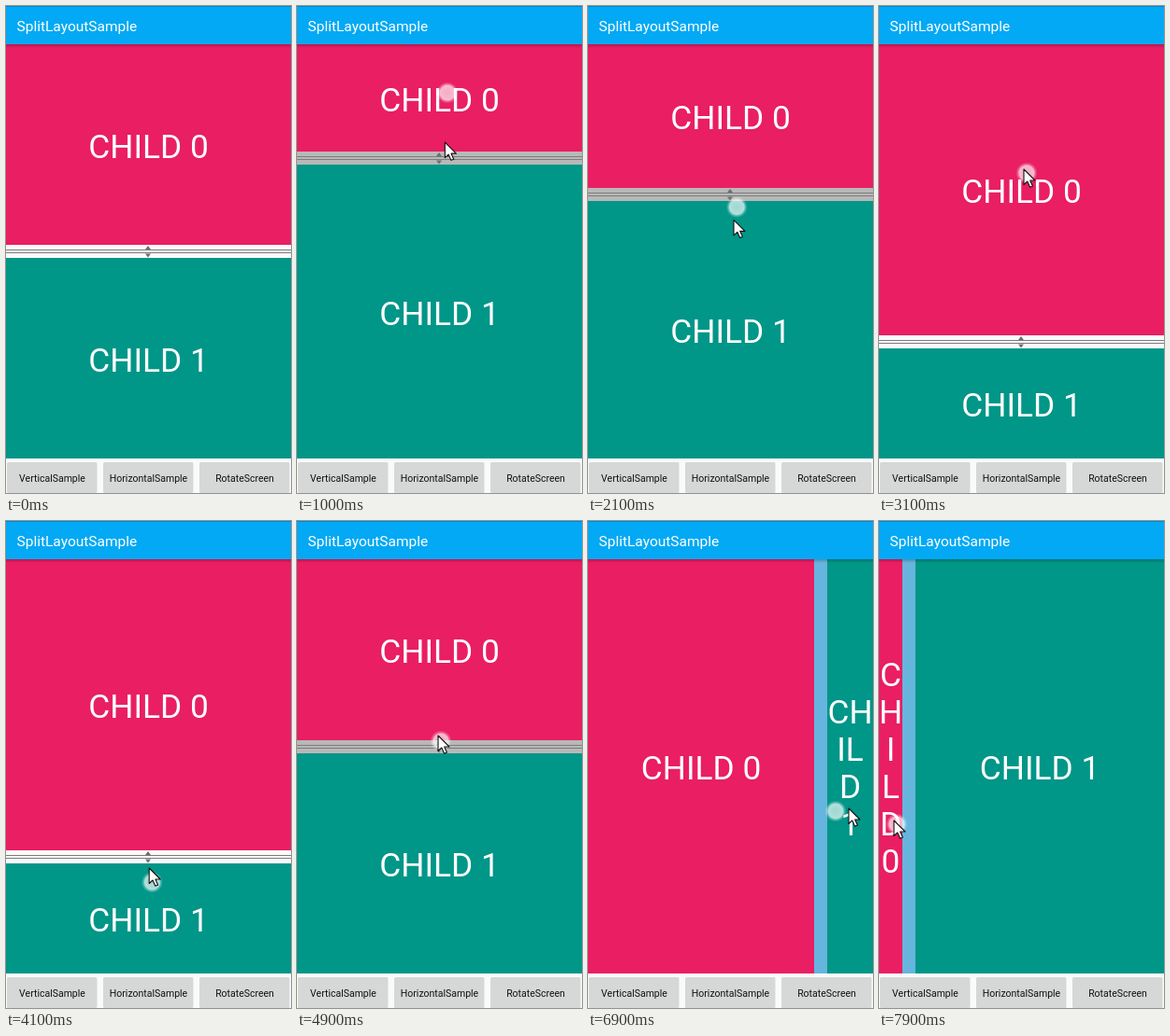
Recreate the animation shown at these times as an HTML page. Size 305x522 px, loop 8000 ms.

```html
<!DOCTYPE html>
<html lang="en">
<head>
<meta charset="utf-8">
<title>Split layout</title>
<style>
  html, body { margin: 0; width: 100%; height: 100%; overflow: hidden; background: #fafafa; }
  svg { display: block; width: 305px; height: 522px; }
  text { font-family: Roboto, sans-serif; }
  .child { font-size: 35.3px; fill: #fff; text-anchor: middle; }
  .label { font-size: 10.5px; fill: #111; text-anchor: middle; }
</style>
</head>
<body>
<svg viewBox="0 0 305 522">
  <defs>
    <linearGradient id="shade" x2="0" y2="1">
      <stop offset="0" stop-opacity=".22"/>
      <stop offset="1" stop-opacity="0"/>
    </linearGradient>
    <radialGradient id="glow">
      <stop offset="0" stop-color="#fff" stop-opacity=".62"/>
      <stop offset=".68" stop-color="#fff" stop-opacity=".7"/>
      <stop offset=".8" stop-color="#fff" stop-opacity=".32"/>
      <stop offset="1" stop-color="#fff" stop-opacity="0"/>
    </radialGradient>
  </defs>
  <rect width="305" height="522" fill="#fafafa"/>
  <rect id="pane0" fill="#e91e63"/>
  <rect id="pane1" fill="#009688"/>
  <rect id="bar"/>
  <g id="grip">
    <path d="M0 5.5H305M0 8.5H305" stroke="#7c7c7c"/>
    <path d="M149 5L152 1L155 5ZM149 9.5L152 13.5L155 9.5Z" fill="#6e6e6e"/>
  </g>
  <g id="text0" class="child"></g>
  <g id="text1" class="child"></g>
  <rect y="41" width="305" height="4" fill="url(#shade)"/>
  <rect width="305" height="41" fill="#03a9f4"/>
  <rect width="305" height="1" fill="#0288d1"/>
  <text x="11.5" y="27" font-size="15.5" fill="#fff">SplitLayoutSample</text>
  <g id="buttons"></g>
  <circle id="touch" r="11.5" fill="url(#glow)"/>
  <path id="cursor" d="M0 0V16.5L3.8 13L6.6 19.2L9.4 18L6.7 12H12Z" fill="#fff" stroke="#111" stroke-width="1.1" stroke-linejoin="round"/>
</svg>
<script>
const NS = 'http://www.w3.org/2000/svg';
const $ = id => document.getElementById(id);
const LOOP = 8000, STEP = 100, LAG = 40;
const TOP = 41, BOTTOM = 485, WIDTH = 305, BAR = 14, LINE = 40;

// Pointer path: time, x, y
const path = [
  [100, 160, 259], [200, 160, 259], [350, 160, 230], [700, 161, 93], [960, 161, 93],
  [1200, 163, 436], [1440, 163, 160], [1500, 163, 154], [1700, 162, 94], [1800, 161, 100],
  [2250, 158, 300], [2450, 157, 385], [2700, 157, 385], [2800, 157, 360], [3000, 158, 179],
  [3250, 158, 179], [3600, 157, 222], [3650, 157, 222], [3660, 157, 432], [3900, 157, 432],
  [4150, 156, 362], [4400, 156, 462], [4660, 155, 362], [4700, 155, 350], [4820, 154, 238],
  [4900, 154, 234], [5100, 154, 234], [5500, 140, 510], [5800, 140, 510], [5860, 142, 510],
  [5900, 148, 511], [6000, 158, 490], [6300, 152, 305], [6560, 152, 308], [6820, 249, 310],
  [6860, 265, 311], [6900, 282, 312], [7000, 296, 313], [7240, 296, 314], [7840, 19, 325]
];
const drags = [[200, 2650], [4200, 5100], [6400, LOOP]];
const FLIP = 5700;

const clamp = (v, lo, hi) => Math.min(hi, Math.max(lo, v));

function pointer(t) {
  const i = path.findIndex(k => k[0] > t);
  if (i === 0) return path[0].slice(1);
  if (i < 0) return path[path.length - 1].slice(1);
  const [a, b] = [path[i - 1], path[i]];
  const f = (t - a[0]) / (b[0] - a[0]);
  return [1, 2].map(n => a[n] + (b[n] - a[n]) * f);
}

// The divider follows the pointer while dragged and then stays put
function split(t, flat) {
  const [from, to] = flat ? drags[2] : drags[t < drags[1][0] ? 0 : 1];
  const p = pointer(clamp(t, from, to) - 2 * LAG);
  return Math.round(flat ? clamp(p[0] - 7, 25, 266) : clamp(p[1] - 3, 156, 353));
}

function set(node, attrs) {
  for (const k in attrs) node.setAttribute(k, attrs[k]);
  return node;
}

function add(parent, tag, attrs, content = '') {
  const node = set(document.createElementNS(NS, tag), attrs);
  node.textContent = content;
  return parent.appendChild(node);
}

const ruler = document.createElement('canvas').getContext('2d');
ruler.font = '35.3px Roboto, sans-serif';
const fits = (s, w) => ruler.measureText(s).width <= w;

function wrap(str, w) {
  const lines = [];
  let line = '';
  for (const word of str.split(' ')) {
    const joined = line ? line + ' ' + word : word;
    if (fits(joined, w)) { line = joined; continue; }
    if (line) lines.push(line);
    line = '';
    for (const c of word) {
      if (line && !fits(line + c, w)) { lines.push(line); line = ''; }
      line += c;
    }
  }
  return [...lines, line];
}

function drawPane(n, x, y, w, h) {
  set($('pane' + n), { x, y, width: w, height: h });
  const group = $('text' + n);
  const lines = wrap('CHILD ' + n, w);
  group.textContent = '';
  lines.forEach((s, i) => add(group, 'text', {
    x: x + w / 2,
    y: y + h / 2 + 14 + (i - (lines.length - 1) / 2) * LINE
  }, s));
}

function draw(t) {
  const flat = t >= FLIP;
  const s = split(t, flat);
  const held = drags.some(([a, b]) => t >= a && t < b);
  const height = BOTTOM - TOP;
  if (flat) {
    drawPane(0, 0, TOP, s, height);
    drawPane(1, s + BAR, TOP, WIDTH - s - BAR, height);
    set($('bar'), { x: s, y: TOP, width: BAR, height, fill: held ? '#66b5de' : '#fafafa' });
  } else {
    drawPane(0, 0, TOP, WIDTH, s - TOP);
    drawPane(1, 0, s + BAR, WIDTH, BOTTOM - s - BAR);
    set($('bar'), { x: 0, y: s, width: WIDTH, height: BAR, fill: held ? '#b8b8b8' : '#fafafa' });
  }
  set($('grip'), { transform: `translate(0 ${s})`, visibility: flat ? 'hidden' : 'visible' });

  const visibility = t < path[0][0] ? 'hidden' : 'visible';
  const [x, y] = pointer(t), [cx, cy] = pointer(t - LAG);
  set($('touch'), { cx, cy, visibility });
  set($('cursor'), { transform: `translate(${x - 3} ${y - 4})`, visibility });
}

['VerticalSample', 'HorizontalSample', 'RotateScreen'].forEach((name, i) => {
  const x = 1 + i * 103;
  add($('buttons'), 'rect', { x, y: 489, width: 96.5, height: 33, rx: 1.5, fill: '#d6d7d7' });
  add($('buttons'), 'text', { class: 'label', x: x + 48.5, y: 509.5 }, name);
});

const start = performance.now();
function tick() {
  const t = (performance.now() - start) % LOOP;
  draw(Math.floor(t / STEP) * STEP);
  requestAnimationFrame(tick);
}
tick();
</script>
</body>
</html>
```
